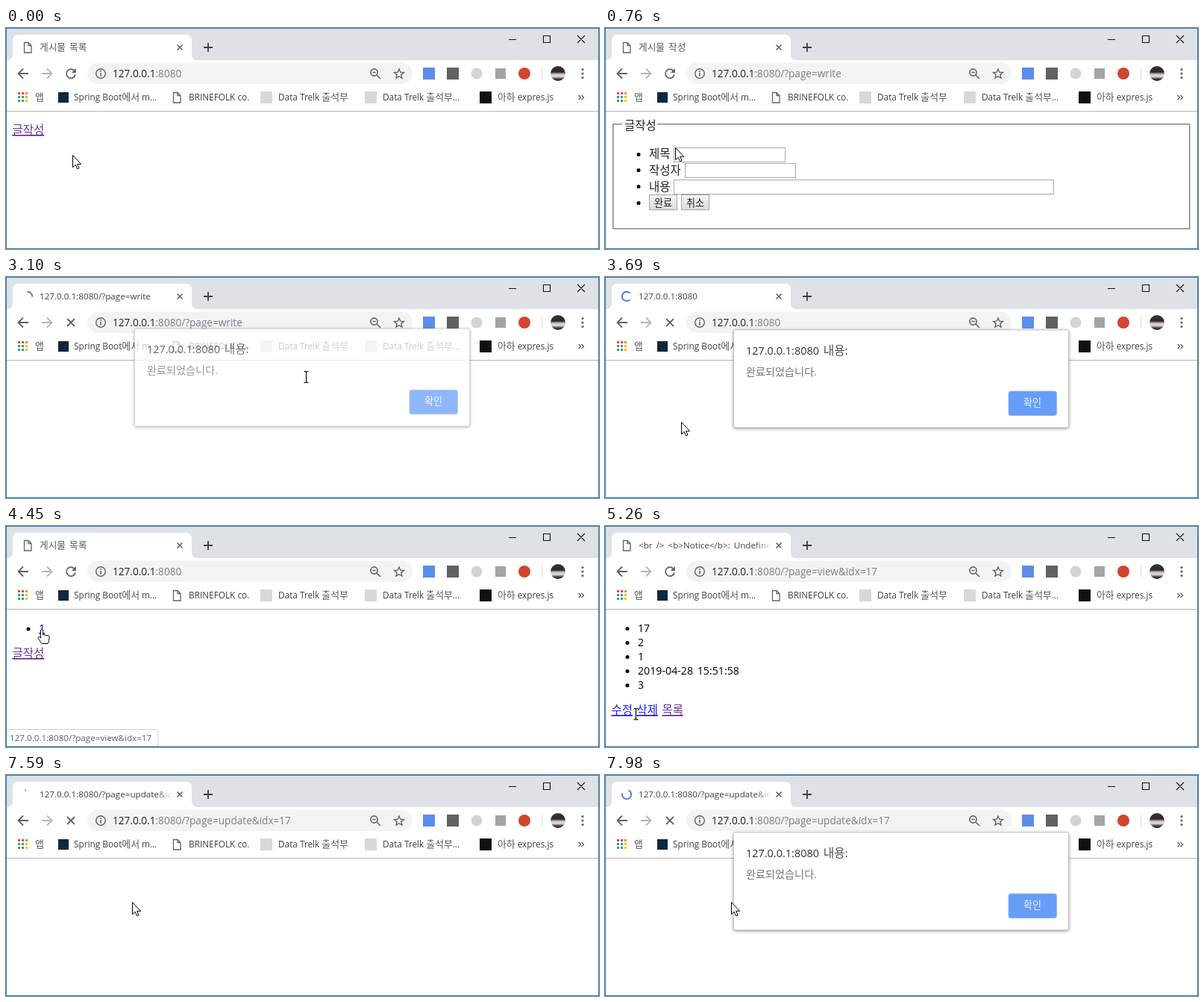
These frames come from a looping animation (795x296 px, 8000 ms). An HTML page:

```html
<!DOCTYPE html>
<html lang="ko">
<head>
<meta charset="utf-8">
<title>게시판</title>
<style>
html, body { margin: 0; width: 100%; height: 100%; overflow: hidden; background: #fff; }
svg { display: block; width: 795px; height: 296px; font-family: "Open Sans", "Noto Sans", "Noto Sans CJK KR", "Noto Sans CJK", sans-serif; }
tspan.ko { font-weight: 300; fill-opacity: .88; }
.arial { font-family: "Liberation Sans", "Noto Sans CJK KR", sans-serif; }
.link { text-decoration: underline; text-decoration-thickness: 1px; }
.airy { word-spacing: 2px; }
.line { fill: none; stroke: #5f6368; stroke-width: 1.8; }
.dialog { filter: drop-shadow(0 1px 2px rgba(0, 0, 0, .45)); }
</style>
</head>
<body>
<svg viewBox="0 0 795 296">
  <defs>
    <clipPath id="tabClip"><rect x="40" y="10" width="183" height="32"/></clipPath>
    <linearGradient id="fade"><stop stop-color="#fff" stop-opacity="0"/><stop offset="1" stop-color="#fff"/></linearGradient>
    <linearGradient id="photo" x2="0" y2="1">
      <stop stop-color="#3a3338"/><stop offset=".4" stop-color="#2c272d"/><stop offset=".55" stop-color="#cfc8c4"/>
      <stop offset=".7" stop-color="#e2dcd8"/><stop offset=".85" stop-color="#4a4446"/><stop offset="1" stop-color="#1a191d"/>
    </linearGradient>
    <linearGradient id="btn" x2="0" y2="1"><stop stop-color="#f4f4f4"/><stop offset="1" stop-color="#dcdcdc"/></linearGradient>
  </defs>
  <g id="page" class="airy"></g>
  <g id="frame"></g>
  <g id="nav" class="airy"></g>
  <g id="over" class="airy"></g>
  <rect x=".5" y=".5" width="794" height="295" fill="none" stroke="#1883d7"/>
</svg>
<script>
const LOOP = 8000;
const HOST = '127.0.0.1:8080';
const BLUE = '#0000ee', VISITED = '#551a8b';

// Screen updates come in bursts: start, end, number of steps
const BURSTS = [
  [60, 830, 12], [880, 1450, 9], [1700, 1700, 1], [2210, 2210, 1], [2440, 2740, 5],
  [2920, 3690, 13], [3750, 4510, 12], [4560, 5330, 13], [5380, 6130, 12],
  [6200, 6310, 2], [6580, 7160, 10], [7590, 7980, 7]
];

// Pointer path: time, x, y, shape (kept until the next entry)
const PATH = [
  [0, 89, 170, 'arrow'], [60, 86, 166, 'arrow'], [340, 34, 138, 'hand'], [550, 34, 138, 'arrow'],
  [830, 105, 164, 'arrow'], [1090, 160, 170, 'beam'], [1190, 160, 170, 'arrow'], [1450, 400, 133, 'arrow'],
  [2920, 400, 133, 'beam'], [3230, 400, 133, 'arrow'], [3690, 102, 194, 'arrow'], [4250, 48, 139, 'hand'],
  [4680, 48, 139, 'arrow'], [5260, 39, 251, 'beam'], [5330, 34, 250, 'hand'], [5450, 24, 248, 'hand'],
  [5740, 24, 248, 'arrow'], [6130, 150, 166, 'beam'], [6310, 169, 170, 'beam'], [7590, 169, 170, 'arrow']
];

// Start time, page, query, tab title (none while loading)
const PAGES = [
  [0, 'list', '', '게시물 목록'],
  [560, 'form', '/?page=write', '게시물 작성'],
  [2920, 'wait', '/?page=write'],
  [3590, 'load', ''],
  [3800, 'posts', '', '게시물 목록'],
  [4680, 'view', '/?page=view&idx=17', '<br /> <b>Notice</b>: Undefined'],
  [5740, 'form', '/?page=update&idx=17', '게시물 수정'],
  [7590, 'wait', '/?page=update&idx=17']
];

// Keyboard: time, focused field, its value (none = keep)
const WRITE_KEYS = [[1160, 0], [2440, 0, '1'], [2510, 1], [2585, 1, '2'], [2660, 2], [2735, 2, '3']];
const EDIT_KEYS = [
  [6200, 0], [6580, 0, '11'], [6700, 1], [6770, 1, '2'], [6830, 1, '22'],
  [6960, 2], [7025, 2, '3'], [7090, 2, '33'], [7150, 3]
];

const HINTS = [
  [340, 620, '/?page=write'], [4250, 4740, '/?page=view&idx=17'], [5400, 6190, '/?page=update&idx=17']
];

const $ = id => document.getElementById(id);
const clamp = v => Math.max(0, Math.min(1, v));
const lastAt = (list, t) => list.filter(e => e[0] <= t).pop();
const esc = s => s.replace(/&/g, '&amp;').replace(/</g, '&lt;');

// Hangul runs are set a little larger and lighter than Latin ones
function text(x, y, size, str, fill = '#000', more = '') {
  const body = esc(str).replace(/[가-힣]+/g, m => `<tspan class="ko" font-size="${(size * 1.09).toFixed(2)}">${m}</tspan>`);
  return `<text x="${x}" y="${y}" font-size="${size}" fill="${fill}" ${more}>${body}</text>`;
}
const rect = (x, y, w, h, fill, more = '') =>
  `<rect x="${x}" y="${y}" width="${w}" height="${h}" fill="${fill}" ${more}/>`;
const circle = (x, y, r, fill, more = '') => `<circle cx="${x}" cy="${y}" r="${r}" fill="${fill}" ${more}/>`;
const line = (d, more = '') => `<path class="line" d="${d}" ${more}/>`;
const sheet = (x, y) => line(`M${x} ${y}h5.5l4 4v9.5h-9.5zM${x + 5.5} ${y}v4h4`, 'style="stroke-width:1.3"');
const link = (x, y, str, fill) => text(x, y, 14.2, str, fill, 'class="link"');
const bullet = (x, y) => circle(x, y, 2.5, '#000');

function drawFrame() {
  const apps = ['#ea4335', '#ea4335', '#f08a3c', '#34a853', '#4285f4', '#fbbc05', '#34a853', '#34a853', '#fbbc05']
    .map((c, i) => rect(16 + i % 3 * 5, 86 + Math.floor(i / 3) * 5, 3, 3, c)).join('');
  const mark = (x, s) => text(x, 97, 11.8, s, '#3c4043');
  return rect(0, 0, 795, 43, '#dee1e6')
    + rect(0, 43, 795, 68, '#fff') + rect(0, 111, 795, 1, '#b6b6b6')
    + '<path d="M1 43q8 0 8-8V17q0-8 8-8H241q8 0 8 8V35q0 8 8 8z" fill="#fff"/>'
    + line('M229.5 22.5l7 7m0-7l-7 7', 'style="stroke-width:1.6"')
    + line('M265 26h12M271 20v12', 'style="stroke:#3c4043"')
    + line('M674 15.5h10M720.5 10.5h9v9h-9zM766 10l10 10m0-10l-10 10', 'style="stroke:#111;stroke-width:1.1"')
    + line('M30 61H17M23 54.5L16.5 61l6.5 6.5')
    + line('M48 61h13M55 54.5l6.5 6.5-6.5 6.5', 'style="stroke:#b4b7ba"')
    + rect(109, 46.5, 436, 28.5, '#f1f3f4', 'rx="14.25"')
    + line('M127 60v4.5M127 57v1.7', 'style="stroke-width:1.6"')
    + circle(127, 61, 6.3, 'none', 'stroke="#5f6368" stroke-width="1.4"')
    + circle(493.5, 59.5, 4.6, 'none', 'stroke="#5f6368" stroke-width="1.6"')
    + line('M497 63l5 5M491.3 59.5h4.4', 'style="stroke-width:1.5"')
    + line('M527 55l1.8 4.2 4.6.4-3.5 3 1.1 4.5-4-2.4-4 2.4 1.1-4.5-3.5-3 4.6-.4z', 'style="stroke-width:1.4"')
    + rect(559, 53, 16, 16, '#5b8dea') + rect(591, 53, 16, 16, '#616161')
    + circle(631, 61, 7.5, '#d4d4d4') + rect(656, 54, 14, 14, '#a3a3a8')
    + circle(695, 61, 8, '#d2452f') + rect(718, 53, 1, 16, '#dadce0')
    + circle(740, 61, 10, 'url(#photo)')
    + [55.5, 61, 66.5].map(y => circle(773, y, 1.6, '#5f6368')).join('')
    + apps + mark(39, '앱')
    + rect(70, 86, 14, 14, '#10283c') + mark(91, 'Spring Boot에서 m…')
    + sheet(224.5, 86.5) + mark(245, 'BRINEFOLK co.')
    + rect(341, 85, 16, 16, '#d8d8d8') + mark(365, 'Data Trelk 출석부')
    + rect(481, 85, 16, 16, '#d8d8d8') + mark(505, 'Data Trelk 출석부…')
    + rect(635, 85, 16, 16, '#111') + mark(659, '아하 expres.js')
    + line('M767.5 90l3 3-3 3M771.5 90l3 3-3 3', 'style="stroke-width:1.4"');
}

function arc(cx, cy, r, from, sweep, color) {
  const pt = a => `${(cx + r * Math.cos(a * Math.PI / 180)).toFixed(2)} ${(cy + r * Math.sin(a * Math.PI / 180)).toFixed(2)}`;
  return line(`M${pt(from)}A${r} ${r} 0 ${sweep > 180 ? 1 : 0} 1 ${pt(from + sweep)}`, `style="stroke:${color};stroke-width:2"`);
}

function drawNav(t, [since, kind, query, title]) {
  const busy = !title;
  const age = t - since;
  let icon = sheet(24.5, 19.5);
  if (kind === 'wait') icon = arc(29, 26, 6.2, -125 + age * .155, Math.max(15, Math.min(270, age * .81 - 55)), '#5682c9');
  if (kind === 'load') icon = arc(29, 26, 6.2, 45 + (t - 3690) * .9, 270, '#3f7ee8');
  const reload = busy
    ? line('M82 56l10 10m0-10L82 66')
    : line('M92 57.8a6 6 0 1 0 .9 4.7') + '<path d="M93.8 54v6h-6z" fill="#5f6368"/>';
  return icon
    + `<g clip-path="url(#tabClip)">${text(45, 30, 11.65, title || HOST + query, '#3c4043')}</g>`
    + rect(201, 14, 22, 26, 'url(#fade)') + reload
    + `<text x="143" y="66" font-size="13.6" fill="#202124">127.0.0.1<tspan fill="#7b8085">:8080${esc(query)}</tspan></text>`;
}

function drawForm(t, editing) {
  const keys = editing ? EDIT_KEYS : WRITE_KEYS;
  const values = editing ? ['1', '2', '3'] : ['', '', ''];
  for (const [at, i, v] of keys) if (at <= t && v !== undefined) values[i] = v;
  const now = lastAt(keys, t);
  const focus = now ? now[1] : -1;
  const tabbed = now && now[2] === undefined && focus > 0;
  const caretOn = now && (now[0] === 1160 ? t < 1700 || t >= 2210 : true);

  const field = (i, x, y, w) => {
    const on = focus === i, wide = values[i].length * 7.42;
    const picked = on && tabbed && values[i];
    return rect(x + .5, y + .5, w - 1, 19, '#fff', `stroke="${on ? '#5a8be0' : '#a9a9a9'}"`)
      + (on ? rect(x - .5, y - .5, w + 1, 21, 'none', 'stroke="#7ea6ea" stroke-opacity=".7" rx="1"') : '')
      + (picked ? rect(x + 3, y + 3, wide, 15, '#3390ff') : '')
      + text(x + 3, y + 15, 13.33, values[i], picked ? '#fff' : '#000', 'class="arial"')
      + (on && caretOn && !picked ? rect(x + 2 + Math.round(wide), y + 3, 1, 14, '#000') : '');
  };
  const button = (x, s, on) => rect(x + .5, 223.5, 37, 20, 'url(#btn)', `stroke="${on ? '#5a8be0' : '#a6a6a6'}"`)
    + (on ? rect(x - .5, 222.5, 39, 22, 'none', 'stroke="#7ea6ea" stroke-opacity=".7"') : '')
    + text(x + 7, 238.5, 12, s);

  return rect(11.5, 129.5, 773, 140, 'none', 'stroke="#c6c6c6"')
    + rect(10.5, 128.5, 773, 140, 'none', 'stroke="#828282"')
    + rect(23, 126, 47, 6, '#fff') + text(26, 135.5, 14.2, '글작성')
    + [169, 190, 212, 234].map(y => bullet(45, y + .5)).join('')
    + text(59, 174, 14.2, '제목') + text(59, 195.5, 14.2, '작성자') + text(59, 217.5, 14.2, '내용')
    + field(0, 92, 160, 150) + field(1, 107, 181, 149) + field(2, 92, 203, 510)
    + button(59, '완료', focus === 3) + button(102, '취소');
}

function drawPage(t, [, kind, query]) {
  switch (kind) {
    case 'list': return link(8.5, 142, '글작성', VISITED);
    case 'posts': return bullet(30, 138) + link(44, 142, '1', BLUE) + link(8.5, 176, '글작성', VISITED);
    case 'form': return drawForm(t, query.includes('update'));
    case 'view':
      return ['17', '2', '1', '2019-04-28 15:51:58', '3']
        .map((s, i) => bullet(30, 137.5 + i * 19) + text(44, 142 + i * 19, 14.2, s)).join('')
        + link(8.5, 252, '수정', BLUE) + link(42.5, 252, '삭제', BLUE) + link(76.5, 252, '목록', VISITED);
  }
  return '';
}

function drawDialog(t) {
  const grow = from => clamp((t - from) / 190);
  const p = t < 5000 ? grow(3045) - grow(3595) : grow(7720);
  if (p <= 0) return '';
  return `<g class="dialog" transform="translate(0 ${(12 * (p - 1)).toFixed(2)})" opacity="${Math.min(1, p * 2.05).toFixed(2)}">`
    + rect(172.5, 77, 449, 130.5, '#fff', 'rx="2" stroke="#bdbdbd" stroke-width=".7"')
    + text(189, 110, 14.45, HOST + ' 내용:', '#303236')
    + text(189, 137.5, 13, '완료되었습니다.', '#5f6368')
    + rect(541, 159, 64.5, 32.5, '#669df6', 'rx="3" stroke="#8fb8fa"')
    + text(561, 179, 12, '확인', '#fff') + '</g>';
}

function drawHint(t) {
  const hint = HINTS.find(([a, b]) => t >= a && t < b + 120);
  if (!hint) return '';
  const [a, b, query] = hint;
  const alpha = Math.min(clamp((t - a) / 150 + .2), clamp(1 - (t - b) / 120));
  const width = 20 + (HOST + query).length * 5.75;
  return `<g opacity="${alpha.toFixed(2)}"><path d="M1 272.5H${width - 4}q4 0 4 4V295H1z" fill="#fff" stroke="#d0d2d5"/>`
    + text(5, 288, 11.65, HOST + query, '#5f6368') + '</g>';
}

const SHAPES = {
  arrow: '<path d="M.5 .5V16.6L4.2 13.2l2.4 5.5 2.4-1-2.4-5.4h5.1z" fill="#fff" stroke="#000"/>',
  hand: '<path d="M-1.5 1a1.5 1.5 0 0 1 3 0v5.5l7 1.3a2 2 0 0 1 1.6 2l-.6 5-1.5 3.7h-8l-5-7a1.4 1.4 0 0 1 2-1.8l1.5 1.5z" fill="#fff" stroke="#000"/>',
  beam: '<path d="M-.5-6.5h2l1 1 1-1h2M2.5-5.5V8M-.5 8.5h2l1-1 1 1h2" fill="none" stroke="#000" stroke-width="1.1"/>'
};

function drawPointer(t) {
  const a = lastAt(PATH, t);
  const b = PATH[PATH.indexOf(a) + 1] || a;
  const k = b === a ? 0 : (t - a[0]) / (b[0] - a[0]);
  const ease = k * k * (3 - 2 * k);
  const at = i => Math.round(a[i] + (b[i] - a[i]) * ease);
  return `<g transform="translate(${at(1)} ${at(2)})">${SHAPES[a[3]]}</g>`;
}

// Time of the latest screen update
function held(t) {
  const burst = lastAt(BURSTS, t);
  if (!burst) return 0;
  const [a, b, n] = burst;
  if (n === 1) return a;
  const step = (b - a) / (n - 1);
  return a + Math.min(n - 1, Math.floor((t - a + 15) / step)) * step;
}

function render(u) {
  const page = lastAt(PAGES, u);
  $('page').innerHTML = drawPage(u, page);
  $('nav').innerHTML = drawNav(u, page);
  $('over').innerHTML = drawHint(u) + drawDialog(u) + drawPointer(u);
}

let shown = -1;
function tick() {
  const u = held(performance.now() % LOOP);
  if (u !== shown) {
    render(u);
    shown = u;
  }
  requestAnimationFrame(tick);
}

$('frame').innerHTML = drawFrame();
tick();
</script>
</body>
</html>
```
